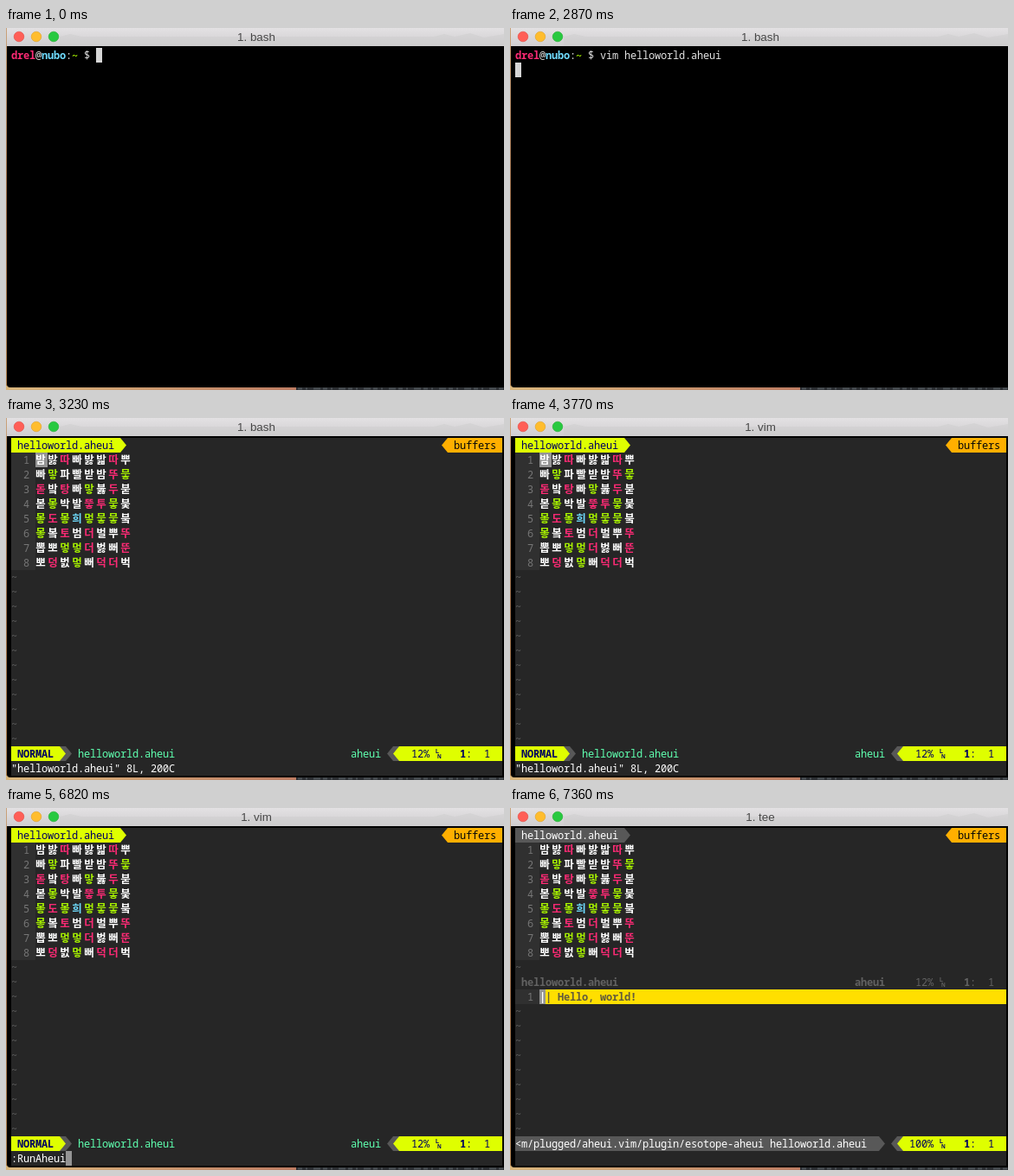
An HTML page for the animation above (8 s loop, 575 px wide and 419 px high).

```html
<!DOCTYPE html>
<html lang="en">
<head>
<meta charset="utf-8">
<title>Terminal session</title>
<style>
  html, body { margin: 0; width: 100%; height: 100%; overflow: hidden; background: #000; }
  svg { display: block; width: 575px; height: 419px; }
  text { white-space: pre; }
  .mono { font: 12px "Noto Sans Mono", "DejaVu Sans Mono", monospace; letter-spacing: -0.2px; }
  .hangul { font: bold 12.5px "Noto Sans CJK KR", "Noto Sans CJK JP", "Noto Sans CJK", sans-serif; text-anchor: middle; }
  .title { font: 13.4px "Liberation Sans", Arial, sans-serif; text-anchor: middle; fill: #474747; }
  .tiny { font: bold 6.5px "Liberation Sans", Arial, sans-serif; }
</style>
</head>
<body>
<svg viewBox="0 0 575 419">
  <defs>
    <linearGradient id="bar" x2="0" y2="1">
      <stop offset="0" stop-color="#e3e1e3"/><stop offset="1" stop-color="#d0ced0"/>
    </linearGradient>
    <linearGradient id="side" x2="0" y2="1">
      <stop offset="0" stop-color="#c9a27a"/><stop offset=".5" stop-color="#a0704c"/><stop offset="1" stop-color="#b98a58"/>
    </linearGradient>
    <linearGradient id="sand">
      <stop offset="0" stop-color="#d9b67c"/><stop offset="1" stop-color="#bd7c62"/>
    </linearGradient>
  </defs>
  <rect width="575" height="419" fill="url(#side)"/>
  <rect y="414" width="335" height="5" fill="url(#sand)"/>
  <rect x="335" y="414" width="240" height="5" fill="#2b2e32"/>
  <path d="M337 417.5H575" stroke="#4d5257" stroke-width="2" stroke-dasharray="5 4 2 7 8 3"/>
  <path d="M1 20H575V416H5Q1 416 1 412Z" fill="#000"/>
  <rect x="1" width="574" height="21" fill="url(#bar)"/>
  <path d="M62 10L74 7L88 10H494L506 7L518 10L536 6L552 11L575 7V21H62Z" fill="#cac9cb" opacity=".45"/>
  <g stroke-width=".6">
    <circle cx="15" cy="10" r="5.8" fill="#ff5f57" stroke="#e2463f"/>
    <circle cx="35" cy="10" r="5.8" fill="#ffbd2e" stroke="#dfa023"/>
    <circle cx="55" cy="10" r="5.8" fill="#28c940" stroke="#1dad2b"/>
  </g>
  <text id="title" class="title" x="289" y="15"></text>
  <g id="screen"></g>
</svg>
<script>
const LOOP = 8000, CW = 7, RH = 17, COLS = 81, LAST = 22;
const C = {
  bg: '#262626', gutter: '#303030', num: '#767676', tilde: '#5f5f5f', white: '#fff', shell: '#e2e2e2',
  pink: '#fb2a74', cyan: '#6fdcff', green: '#a6f000', lime: '#dfff00', navy: '#00005f',
  orange: '#ffaf00', mint: '#5fffaf', gray: '#585858', dim: '#626262', gold: '#ffdf00',
  block: '#d6d6d6', vimBlock: '#949494'
};
const FILE = 'helloworld.aheui';
const SOURCE = ['밤밣따빠밣밟따뿌', '빠맣파빨받밤뚜뭏', '돋밬탕빠맣붏두붇', '볻뫃박발뚷투뭏붖',
  '뫃도뫃희멓뭏뭏붘', '뫃봌토범더벌뿌뚜', '뽑뽀멓멓더벓뻐뚠', '뽀덩벐멓뻐덕더벅'];

// Typed text by start time
const SHELL = [[0, ''], [180, 'v'], [360, 'vi'], [530, 'vim'], [710, 'vim '], [890, 'vim he'], [1070, `vim ${FILE} `]];
const COMMAND = [[5740, ':'], [6100, ':R'], [6280, ':Ru'], [6460, ':Run'], [6820, ':RunAheui']];
const TITLES = [[0, '1. bash'], [3770, '1. vim'], [7360, '1. tee']];
const ENTER = 2870, OPEN = 3050, DRAWN = 3230, CLEAR = 7180, RESULT = 7360;

const at = (steps, t) => steps.filter(s => s[0] <= t).pop()?.[1];
const px = col => 6 + CW * col;
const py = row => 23 + RH * row;
const esc = s => s.replace(/&/g, '&amp;').replace(/</g, '&lt;');

const box = (col, row, cols, fill, rows = 1) =>
  `<rect x="${px(col)}" y="${py(row)}" width="${cols * CW}" height="${rows * RH}" fill="${fill}"/>`;
const write = (col, row, s, fill, bold) =>
  `<text class="mono" x="${px(col)}" y="${py(row) + 13}" fill="${fill}"${bold ? ' font-weight="700" style="font-weight:700"' : ''}>${esc(s)}</text>`;
// Filled triangle, one cell wide, pointing right (1) or left (-1)
const arrow = (col, row, dir, fill) => {
  const base = px(dir > 0 ? col : col + 1), y = py(row);
  return `<path d="M${base} ${y}l${dir * CW} ${RH / 2}l${-dir * CW} ${RH / 2}z" fill="${fill}"/>`;
};
const lineSign = (row, fill) =>
  `<text class="tiny" fill="${fill}" x="${px(70)}" y="${py(row) + 8}">L</text>` +
  `<text class="tiny" fill="${fill}" x="${px(70) + 2}" y="${py(row) + 14}">N</text>`;

function shell(t) {
  const typed = at(SHELL, t), entered = t >= ENTER;
  return write(0, 0, 'drel', C.pink, true) + write(4, 0, '@', C.shell) +
    write(5, 0, 'nubo', C.cyan, true) + write(9, 0, ':', C.shell) +
    write(10, 0, '~', C.green, true) + write(12, 0, '$', C.shell) + write(14, 0, typed, C.shell) +
    (entered ? box(0, 1, 1, C.block) : box(14 + typed.length, 0, 1, C.block));
}

function glyphColor(ch) {
  const initial = Math.floor((ch.charCodeAt(0) - 0xAC00) / 588);
  return { 3: C.pink, 4: C.pink, 16: C.pink, 6: C.green, 18: C.cyan }[initial] || C.white;
}

function sourceLines() {
  return box(0, 1, 4, C.gutter, 8) + SOURCE.map((line, r) =>
    write(2, r + 1, String(r + 1), C.num) + [...line].map((ch, c) =>
      `<text class="hangul" x="${px(4 + 2 * c) + 6}" y="${py(r + 1) + 12.5}" fill="${glyphColor(ch)}">${ch}</text>`
    ).join('')).join('');
}

function tildes(from, to) {
  let out = '';
  for (let r = from; r <= to; r++) out += write(0, r, '~', C.tilde);
  return out;
}

function tabLine(fill, ink) {
  return box(0, 0, 18, fill) + arrow(18, 0, 1, fill) + write(1, 0, FILE, ink) +
    arrow(71, 0, -1, C.orange) + box(72, 0, 9, C.orange) + write(73, 0, 'buffers', '#080808');
}

function position(row, percent, ink, bold) {
  return write(69 - percent.length, row, percent, ink, bold) + lineSign(row, ink) +
    write(74, row, '1', ink, true) + write(75, row, ':  1', ink, bold);
}

function positionBar(row, percent) {
  return arrow(62, row, -1, C.gray) + box(63, row, 1, C.gray) + arrow(63, row, -1, C.lime) +
    box(64, row, 17, C.lime) + position(row, percent, C.navy);
}

function editor(t) {
  const cmd = at(COMMAND, t);
  return tabLine(C.lime, C.navy) +
    (cmd ? '' : box(4, 1, 2, C.vimBlock)) + sourceLines() + tildes(9, 20) +
    box(0, 21, 8, C.lime) + box(8, 21, 1, C.gray) + arrow(8, 21, 1, C.lime) + arrow(9, 21, 1, C.gray) +
    write(1, 21, 'NORMAL', C.navy, true) + write(11, 21, FILE, C.mint) + write(56, 21, 'aheui', C.mint) +
    positionBar(21, '12%') +
    (cmd ? write(0, LAST, cmd, C.white) + box(cmd.length, LAST, 1, C.vimBlock) : message());
}

const message = () => write(0, LAST, `"${FILE}" 8L, 200C`, C.white);

function result() {
  return tabLine(C.gray, C.white) + sourceLines() + tildes(9, 9) +
    write(1, 10, FILE, C.dim, true) + write(56, 10, 'aheui', C.dim, true) + position(10, '12%', C.dim) +
    box(0, 11, 4, C.gutter) + write(2, 11, '1', C.num) +
    box(4, 11, 77, C.gold) + box(4, 11, 1, C.vimBlock) +
    write(4, 11, '|', C.white, true) + write(5, 11, '| Hello, world!', '#625c3c', true) +
    tildes(12, 20) +
    box(0, 21, 60, C.gray) + arrow(60, 21, 1, C.gray) +
    write(0, 21, `<m/plugged/aheui.vim/plugin/esotope-aheui ${FILE}`, C.white) +
    positionBar(21, '100%');
}

function screenAt(t) {
  if (t < OPEN) return shell(t);
  const base = box(0, 0, COLS, C.bg, 23);
  if (t < DRAWN) return base + message();
  if (t < CLEAR) return base + editor(t);
  return t < RESULT ? base : base + result();
}

const screenEl = document.getElementById('screen');
const titleEl = document.getElementById('title');
let shown = null;

function render(t) {
  const html = screenAt(t);
  if (html === shown) return;
  shown = html;
  screenEl.innerHTML = html;
}

const start = performance.now();
function tick() {
  const t = (performance.now() - start) % LOOP;
  const title = at(TITLES, t);
  if (titleEl.textContent !== title) titleEl.textContent = title;
  render(t);
  requestAnimationFrame(tick);
}
tick();
</script>
</body>
</html>
```
